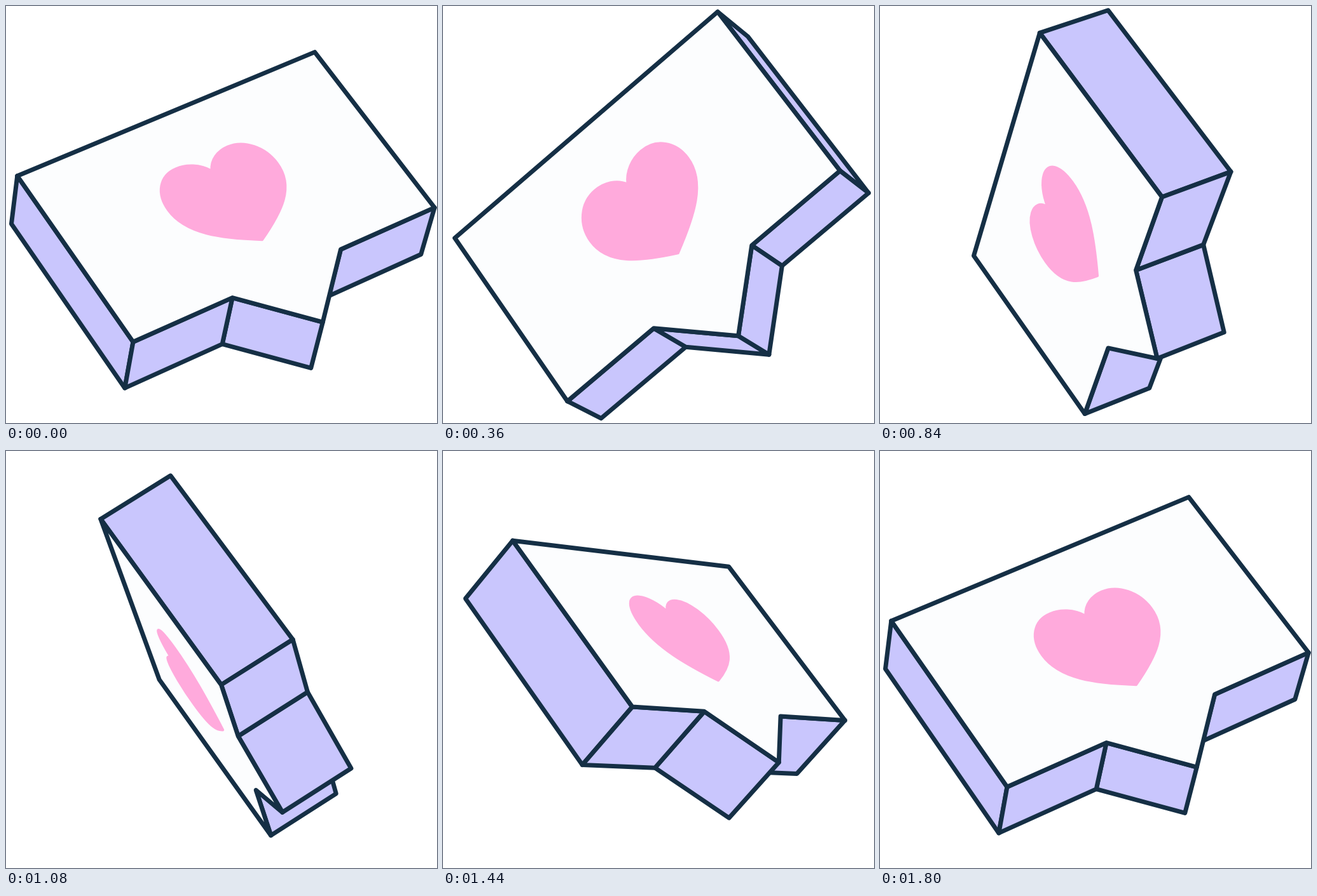
These frames come from a looping animation (678x657 px, 1.83 s). An HTML page with a canvas:

```html
<!DOCTYPE html>
<html lang="en">
<head>
<meta charset="utf-8">
<title>Turning heart bubble</title>
<style>
  html, body { margin: 0; width: 100%; height: 100%; overflow: hidden; background: #fff; }
  canvas { display: block; }
</style>
</head>
<body>
<canvas id="stage" width="678" height="657"></canvas>
<script>
const ctx = document.getElementById('stage').getContext('2d');

const LOOP = 1830, STEP = 30, HALF_TURN = 1800;
const INK = '#152f45', SIDE = '#c9c6fd', FACE = '#fcfdfe', PINK = '#ffaadc';

// Half sizes of the slab, and the camera
const W = 277.2, H = 174.5, T = 63.3, TAIL = 102, NOTCH = 99.7;
const CENTER = [340.1, 330.5], DIST = 5400;
const ROLL = -36.1 * Math.PI / 180, START = -26.4 * Math.PI / 180;
const TILT_SIN = 0.451, TILT_COS = Math.sqrt(1 - TILT_SIN ** 2);

const outline = [
  [-W, -H], [W, -H], [W, H], [NOTCH, H], [0, H + TAIL], [-NOTCH, H], [-W, H]
];

// Right half of the heart: a start point, then cubic curves
const heart = [
  [0, -46],
  [10, -65], [29, -75], [48, -75],
  [79, -75], [101, -47], [101, -12],
  [101, 40], [55, 72], [0, 103]
];

function project(x, y, z, turn) {
  const c = Math.cos(turn), s = Math.sin(turn);
  const across = x * c - z * s;
  const near = x * s + z * c;
  const along = TILT_COS * y - TILT_SIN * near;
  const depth = TILT_SIN * y + TILT_COS * near;
  const k = DIST / (DIST - depth);
  const rc = Math.cos(ROLL), rs = Math.sin(ROLL);
  return {
    x: CENTER[0] + k * (across * rc - along * rs),
    y: CENTER[1] + k * (across * rs + along * rc),
    depth
  };
}

function area(pts) {
  return pts.reduce((sum, p, i) => {
    const q = pts[(i + 1) % pts.length];
    return sum + p.x * q.y - q.x * p.y;
  }, 0);
}

const meanDepth = pts => pts.reduce((sum, p) => sum + p.depth, 0) / pts.length;

function paint(fill, line, width) {
  ctx.fillStyle = fill;
  ctx.strokeStyle = line;
  ctx.lineWidth = width;
  ctx.fill();
  ctx.stroke();
}

function drawPolygon(pts, fill) {
  ctx.beginPath();
  pts.forEach(p => ctx.lineTo(p.x, p.y));
  ctx.closePath();
  paint(fill, INK, 7);
}

function drawHeart(z, turn) {
  const half = sign => heart.map(([x, y]) => project(sign * x, y, z, turn));
  const pts = [...half(1), ...half(-1).reverse().slice(1)];
  ctx.beginPath();
  ctx.moveTo(pts[0].x, pts[0].y);
  for (let i = 1; i < pts.length; i += 3) {
    const [a, b, c] = pts.slice(i, i + 3);
    ctx.bezierCurveTo(a.x, a.y, b.x, b.y, c.x, c.y);
  }
  ctx.closePath();
  paint(PINK, PINK, 4);
}

function draw(time) {
  const t = Math.floor((time % LOOP) / STEP) * STEP;
  const turn = START + Math.PI * t / HALF_TURN;
  const front = outline.map(([x, y]) => project(x, y, T, turn));
  const back = outline.map(([x, y]) => project(x, y, -T, turn));

  ctx.fillStyle = '#fff';
  ctx.fillRect(0, 0, 678, 657);
  ctx.lineJoin = 'round';

  front
    .map((p, i) => {
      const j = (i + 1) % front.length;
      return [front[j], p, back[i], back[j]];
    })
    .filter(quad => area(quad) > 0)
    .sort((a, b) => meanDepth(a) - meanDepth(b))
    .forEach(quad => drawPolygon(quad, SIDE));

  const showFront = area(front) > 0;
  drawPolygon(showFront ? front : back, FACE);
  drawHeart(showFront ? T : -T, turn);
}

const begin = performance.now();
function tick() {
  draw(performance.now() - begin);
  requestAnimationFrame(tick);
}
tick();
</script>
</body>
</html>
```
